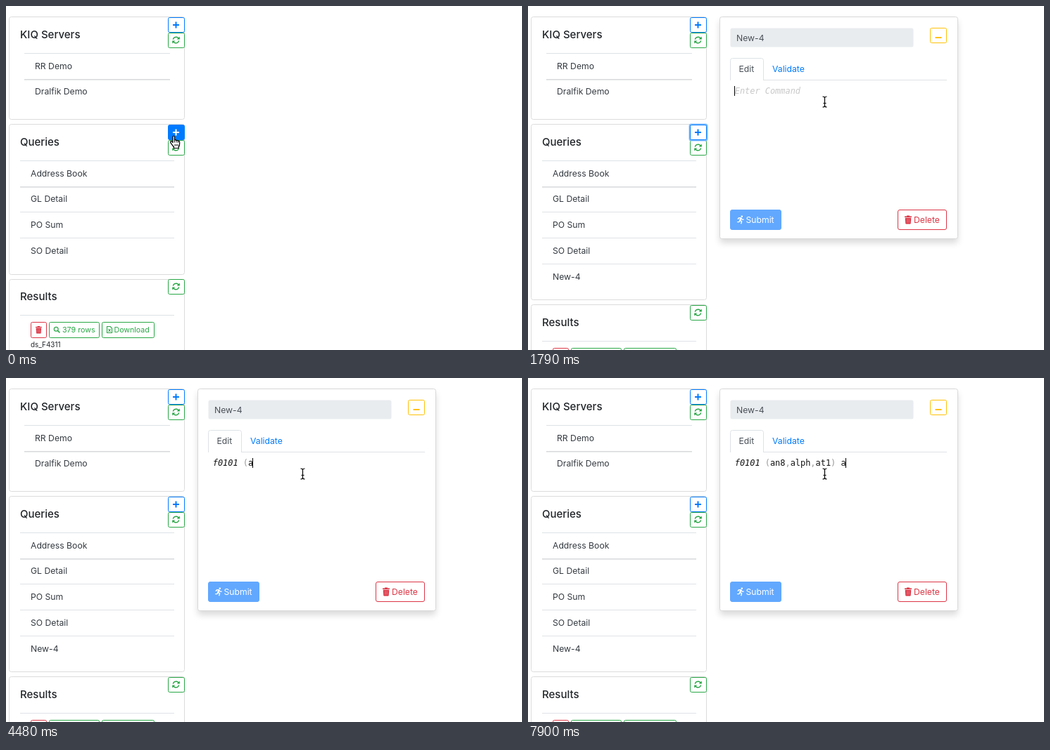
An HTML page with a canvas for the animation above (8000 ms loop, 733 px wide and 490 px high).

```html
<!DOCTYPE html>
<html lang="en">
<head>
<meta charset="utf-8">
<title>Query editor</title>
<style>
html, body { margin: 0; width: 100%; height: 100%; overflow: hidden; background: #fff; }
canvas { display: block; width: 733px; height: 490px; }
</style>
</head>
<body>
<canvas id="stage" width="733" height="490"></canvas>
<script>
const ctx = document.getElementById('stage').getContext('2d');
const LOOP = 8000;
const SANS = 'Inter, sans-serif';
const MONO = '11.93px "DejaVu Sans Mono", monospace';
const BLUE = '#007bff', GREEN = '#28a745', RED = '#dc3545', AMBER = '#ffc107';
const INK = '#212529', BODY = '#343a40', MUTED = '#495057', RULE = '#dee2e6', EDGE = '#dcdcdc';

const COMMAND = 'f0101 (an8,alph,at1) a';
// [time, characters typed]
const KEYS = [
  [2830, 1], [3130, 3], [3280, 4], [3430, 5], [3730, 6], [3880, 7],
  [4480, 8], [4630, 9], [4780, 10], [5230, 11], [5380, 13], [5530, 14],
  [5820, 15], [6120, 16], [6260, 17], [6560, 18], [6860, 19],
  [7160, 20], [7450, 21], [7900, 22]
];
const MOVES = [1050, 1200, 1340, 1490, 1640];

function text(str, x, y, size = 12.2, color = BODY, weight = 400) {
  ctx.font = `${weight} ${size}px ${SANS}`;
  ctx.fillStyle = color;
  ctx.fillText(str, x, y);
}

function box(x, y, w, h, radius, fill, stroke) {
  ctx.beginPath();
  ctx.roundRect(x + 0.5, y + 0.5, w - 1, h - 1, radius);
  if (fill) { ctx.fillStyle = fill; ctx.fill(); }
  if (stroke) { ctx.strokeStyle = stroke; ctx.lineWidth = 1; ctx.stroke(); }
}

function rect(x, y, w, h, color) {
  ctx.fillStyle = color;
  ctx.fillRect(x, y, w, h);
}

function line(points, color, width = 1) {
  ctx.beginPath();
  points.forEach(([x, y]) => ctx.lineTo(x, y));
  ctx.strokeStyle = color;
  ctx.lineWidth = width;
  ctx.stroke();
}

function at(x, y, draw) {
  ctx.save();
  ctx.translate(x, y);
  draw();
  ctx.restore();
}

function plusButton(y, hover, focus) {
  if (focus) box(228, y - 2, 28, 26, 3.5, '#80bdff');
  box(230, y, 24, 22, 2, hover ? BLUE : '#fff', BLUE);
  const color = hover ? '#fff' : BLUE;
  rect(237, y + 10, 9, 2, color);
  rect(240.5, y + 6.5, 2, 9, color);
}

function refreshButton(y) {
  box(230, y, 24, 22, 2, '#fff', GREEN);
  at(241.5, y + 10.5, () => {
    for (let half = 0; half < 2; half++) {
      ctx.beginPath();
      ctx.arc(0, 0, 4.3, Math.PI * 1.07, Math.PI * 1.82);
      ctx.strokeStyle = GREEN;
      ctx.lineWidth = 1.4;
      ctx.stroke();
      ctx.beginPath();
      ctx.moveTo(5.3, -5);
      ctx.lineTo(5.3, -0.9);
      ctx.lineTo(1.2, -0.9);
      ctx.fillStyle = GREEN;
      ctx.fill();
      ctx.rotate(Math.PI);
    }
  });
}

function trash(x, y, scale) {
  at(x, y, () => {
    ctx.scale(scale, scale);
    rect(0, 1, 10, 1.5, RED);
    rect(3, 0, 4, 1.5, RED);
    ctx.beginPath();
    ctx.moveTo(0.7, 3.2);
    ctx.lineTo(9.3, 3.2);
    ctx.lineTo(8.7, 11.3);
    ctx.quadraticCurveTo(8.6, 12, 8, 12);
    ctx.lineTo(2, 12);
    ctx.quadraticCurveTo(1.4, 12, 1.3, 11.3);
    ctx.fill();
    for (const bar of [2.8, 4.7, 6.6]) rect(bar, 4.7, 0.6, 5.7, '#f0a5ac');
  });
}

function runner(x, y) {
  at(x, y, () => {
    ctx.lineCap = ctx.lineJoin = 'round';
    ctx.beginPath();
    ctx.arc(6.8, 1.2, 1.3, 0, 7);
    ctx.fillStyle = '#fff';
    ctx.fill();
    line([[1.3, 4.8], [2.6, 3.1], [5.4, 3.4], [7.3, 5.6], [9.2, 5.6]], '#fff', 1.4);
    line([[5.3, 3.9], [4.2, 6.8]], '#fff', 2.2);
    line([[4.2, 6.8], [6.6, 8.3], [5.8, 11.2]], '#fff', 1.4);
    line([[3.5, 7.8], [2.8, 9.1], [0.7, 9.1]], '#fff', 1.4);
  });
}

function list(items, x, left, right, top) {
  items.forEach((item, i) => {
    const y = top + Math.round(i * 36.7);
    rect(left, y, right - left, i === 1 ? 1.6 : 1, i === 1 ? '#d9dbdd' : RULE);
    text(item, x, y + (i === 1 ? 22 : 23));
  });
}

function results(shift) {
  box(4, 389 + Math.max(0, shift - 1), 250, 130, 3, '#fff', EDGE);
  at(0, shift, () => {
    text('Results', 20, 419, 15, INK, 500);
    refreshButton(389.5 - 0.5);
    rect(20, 440, 219, 1, RULE);
    box(35, 450, 23, 23, 2, '#fff', RED);
    trash(42, 456, 0.88);
    box(61, 450, 72, 23, 2, '#fff', GREEN);
    ctx.beginPath();
    ctx.arc(71.2, 460.2, 2.9, 0, 7);
    ctx.strokeStyle = GREEN;
    ctx.lineWidth = 1.2;
    ctx.stroke();
    line([[73.3, 462.3], [76.4, 465.4]], GREEN, 1.5);
    text('379 rows', 80, 465, 10.7, GREEN);
    box(136, 450, 75, 23, 2, '#fff', GREEN);
    line([[143.5, 456.5], [148, 456.5], [150.5, 459], [150.5, 465.5], [143.5, 465.5], [143.5, 456]], GREEN, 1.1);
    line([[145.4, 460], [148.6, 464]], GREEN, 1.1);
    line([[148.6, 460], [145.4, 464]], GREEN, 1.1);
    text('Download', 153.5, 465, 10.6, GREEN);
    text('ds_F4311', 35, 486, 9.9, INK);
  });
}

function sidebar(hover, focus, added) {
  box(4, 15, 250, 147, 3, '#fff', EDGE);
  text('KIQ Servers', 20, 46, 15, INK, 500);
  list(['RR Demo', 'Dralfik Demo'], 41, 26, 233, 67);
  refreshButton(38);
  plusButton(16, false, false);

  box(4, 168, 250, added ? 251 : 215, 3, '#fff', EDGE);
  text('Queries', 20, 199, 15, INK, 500);
  const names = ['Address Book', 'GL Detail', 'PO Sum', 'SO Detail'];
  list(added ? [...names, 'New-4'] : names, 35, 20, 239, 220);
  refreshButton(191);
  plusButton(169, hover, focus);
  results(added ? 37 : 0);
}

function editorCard() {
  ctx.save();
  ctx.shadowColor = 'rgba(0,0,0,.15)';
  ctx.shadowBlur = 10;
  ctx.shadowOffsetY = 6;
  box(272, 15, 339, 317, 3, '#fff');
  ctx.restore();
  box(272, 15, 339, 317, 3, null, '#d8d8d8');

  box(287, 31, 261, 28, 2.5, '#e9ecef');
  text('New-4', 296, 50, 12.2, MUTED);
  box(571, 31, 24, 22, 2, '#fff', AMBER);
  rect(578.5, 44, 9, 2, AMBER);

  rect(335, 105, 260, 1, RULE);
  ctx.beginPath();
  ctx.moveTo(287.5, 106);
  ctx.arcTo(287.5, 74.5, 300, 74.5, 3);
  ctx.arcTo(334.5, 74.5, 334.5, 90, 3);
  ctx.lineTo(334.5, 106);
  ctx.strokeStyle = RULE;
  ctx.lineWidth = 1;
  ctx.stroke();
  text('Edit', 299.5, 94, 12.2, MUTED);
  text('Validate', 347, 94, 12.2, BLUE);

  box(287, 290, 73, 29, 2.5, '#62a8ff', '#62a8ff');
  runner(297, 298.5);
  text('Submit', 309.5, 309, 12.2, '#fff');
  box(525, 290, 70, 29, 2.5, '#fff', RED);
  trash(535, 298.5, 1);
  text('Delete', 548, 309, 12.2, RED);
}

function editorText(t) {
  let count = 0;
  for (const [time, typed] of KEYS) if (t >= time) count = typed;
  let x = 293.7;
  if (count) {
    for (const token of COMMAND.slice(0, count).match(/f\d*|[(),]|[^(),]+/g)) {
      ctx.font = (/^f\d/.test(token) ? 'italic ' : '') + MONO;
      ctx.fillStyle = /[(),]/.test(token) ? '#999' : '#111';
      ctx.fillText(token, x, 125);
      x += ctx.measureText(token).width;
    }
  } else {
    ctx.font = 'italic ' + MONO;
    ctx.fillStyle = '#c8c8c8';
    ctx.fillText('Enter Command', x, 125);
  }
  if (count || t < 2390) rect(Math.floor(x - 0.5), 114, 1, 14, '#000');
}

function outlined(path) {
  ctx.lineJoin = 'round';
  ctx.strokeStyle = '#000';
  ctx.lineWidth = 1.2;
  ctx.fillStyle = '#fff';
  ctx.fill(path);
  ctx.stroke(path);
}

const HAND = new Path2D('M4 10V1.8Q4 .5 5.2 .5T6.5 1.8V6.5Q7.6 5.7 9 7Q10.4 6.3 11.4 7.7Q13.6 7.4 13.6 9.5V12Q13.6 14 12.2 15.6V18H5.4V16Q3.5 14.3 2.2 12.1L.8 10.1Q.1 8.8 1.2 8.3T4 10Z');
const HAND_LINES = new Path2D('M6.5 6V10M9 7.4V10M11.4 8.2V10.5M7 12.3V15M9 12.3V15M11 12.3V15');
const ARROW = new Path2D('M0 0V14L3.2 11L5.3 16L7.7 15L5.6 10.2H10Z');
const BEAM = new Path2D('M-3 -7.5Q0 -7.5 0 -5.5Q0 -7.5 3 -7.5M0 -5.5V5.5M-3 7.5Q0 7.5 0 5.5Q0 7.5 3 7.5M-2 2H2');

function pointer(t) {
  let step = 0;
  MOVES.forEach(time => { if (t >= time) step = (time - 1050) / 590; });
  const ease = step * step * (3 - 2 * step);
  at(239 + 182.5 * ease, 185 - 48.5 * ease, () => {
    if (step === 0) {
      ctx.translate(-6, -0.5);
      outlined(HAND);
      ctx.lineWidth = 0.9;
      ctx.stroke(HAND_LINES);
    } else if (step < 0.7) {
      outlined(ARROW);
    } else {
      ctx.strokeStyle = '#fff';
      ctx.lineWidth = 3;
      ctx.stroke(BEAM);
      ctx.strokeStyle = '#000';
      ctx.lineWidth = 1.2;
      ctx.stroke(BEAM);
    }
  });
}

function draw() {
  const t = performance.now() % LOOP;
  const added = t >= 1050;
  rect(0, 0, 733, 490, '#fff');
  sidebar(t < 1200, t >= 750 && t < 1940, added);
  if (added) editorCard();
  if (t >= 1790) editorText(t);
  pointer(t);
  requestAnimationFrame(draw);
}
draw();
</script>
</body>
</html>
```
